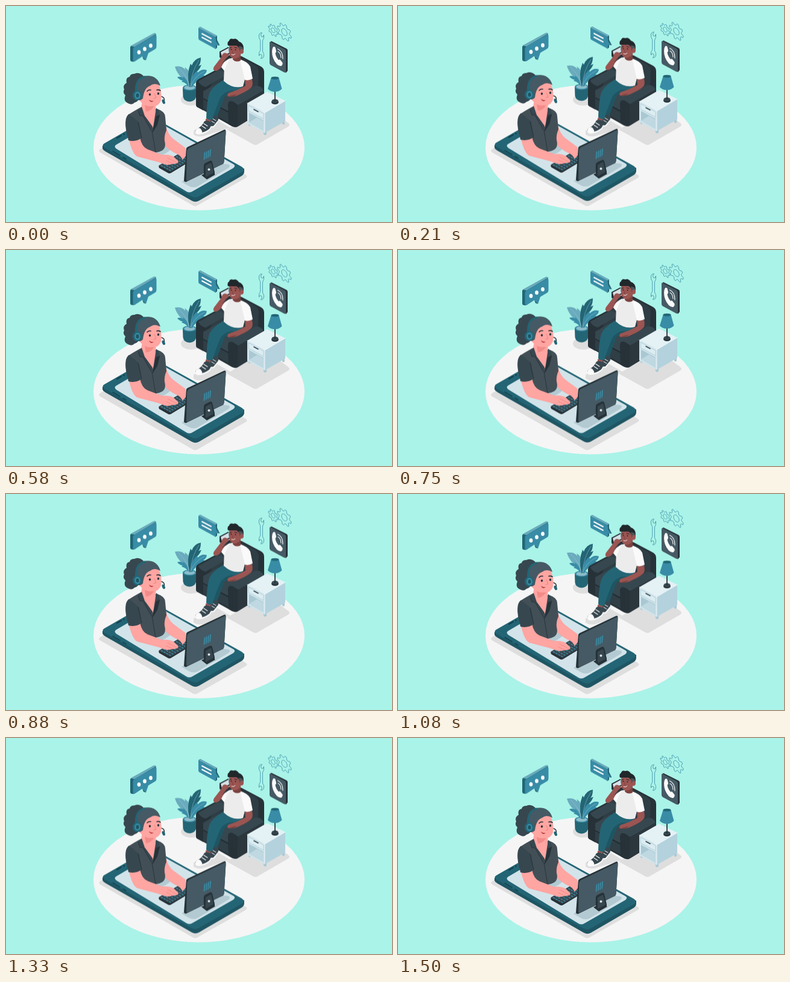
These frames come from a looping animation (640x360 px, 1.54 s). An HTML page:

```html
<!DOCTYPE html>
<html lang="en">
<head>
<meta charset="utf-8">
<title>Customer support</title>
<style>
html, body { margin: 0; width: 100%; height: 100%; overflow: hidden; background: #aaf3e8; }
svg { display: block; width: 100vw; height: 100vh; }
path { stroke-linecap: round; stroke-linejoin: round; }
.teal { fill: #236575; } .blue { fill: #388ca6; } .deep { fill: #1f5563; } .pale { fill: #6aabbd; }
.navy { fill: #37474f; } .dark { fill: #263238; } .slate { fill: #455a64; } .cloth { fill: #434f56; }
.pink { fill: #ffa5a2; } .rose { fill: #f28c88; } .brown { fill: #9b5552; } .umber { fill: #7c423f; }
.white { fill: #fafafa; } .shade { fill: #dedede; }
.line { fill: none; stroke: #388ca6; stroke-width: .8; }
</style>
</head>
<body>
<svg viewBox="0 0 640 360" preserveAspectRatio="none">
  <rect width="640" height="360" fill="#aaf3e8"/>
  <ellipse cx="320" cy="236" rx="175" ry="104.5" fill="#f5f5f5"/>
  <g class="shade">
    <path d="M157 238 L238 191 L397 281 Q402 284 397 287 L318 332 Q314 335 309 332 L156 244 Q152 241 157 238Z"/>
    <path d="M371 203 L432 168 L468 195 Q472 198 468 201 L418 230 Q414 233 409 230 L366 206Z"/>
    <path d="M311 208 L345 187 L372 203 L330 216 Q318 220 311 214Z"/>
    <ellipse cx="307" cy="156" rx="17" ry="10"/>
  </g>

  <g id="bubbleA">
    <path class="teal" d="M208 66.5 L245 46 Q248 45 249 48 L213 93 Q206 94 206 90 L206 69 Q206 67.5 208 66.5Z"/>
    <path class="pale" d="M207 67 L245 46 Q248 45 249 47 L213 68.5Z"/>
    <path class="blue" d="M213 68.5 L246 49.5 Q249.5 47.5 249.5 51 L249.5 68 Q249.5 71 247 72.5 L236 79 L232 91 L226 84.5 L214 92.5 Q210.5 94 210.5 90 L210.5 72.5 Q210.5 70 213 68.5Z"/>
    <path class="deep" d="M226 84.5 L228 89.5 L232 91Z"/>
    <g class="white"><ellipse cx="220.5" cy="77.5" rx="2.9" ry="3.5"/><ellipse cx="230" cy="72" rx="2.9" ry="3.5"/><ellipse cx="240" cy="66.5" rx="2.9" ry="3.5"/></g>
  </g>

  <g id="bubbleB">
    <path class="teal" d="M319 37 L322 35 L350 50 L350 57 L354.5 66 L350 66 L350 70 L347 72Z"/>
    <path class="pale" d="M319 37 L322 35 L350 50 L347 52Z"/>
    <path class="blue" d="M319 37 L346 51.5 Q348 53 348 55 L348 59 L353 66 L348 66 L348 70 Q348 72 346 71 L320.5 57 Q319 56 319 54Z"/>
    <path d="M325 46.5 L340 54.5 M325 52.5 L340 60.5" fill="none" stroke="#fafafa" stroke-width="2"/>
  </g>

  <g id="tools">
    <g class="line">
      <path d="M421.5 57 Q418.5 53 419.5 48 Q421 44 424.5 44.5 L422.5 48 L423.5 51 L426 51.5 L427.5 48 Q428.5 54 425.5 58 L425.5 76 Q428.5 79 427.5 84 Q426 88 422.5 87.5 L424.5 84 L423.5 81 L421 80.5 L419.5 83 Q418.5 78 421.5 74Z"/>
      <path id="gears"/>
    </g>
    <path class="dark" d="M437 61 L440 58.5 L465 71 Q467 72 467 74 L467 108 L464 111.5Z"/>
    <path class="slate" d="M439 60 L462 72 Q464 73.5 464 75.5 L464 108.5 Q464 112 461 110.5 L439 98.5 Q437 97 437 95 L437 61.5 Q437 59 439 60Z"/>
    <path class="white" d="M442.5 69 Q444 66.500 446.500 69 L448 75 Q448.500 77 446.500 78.500 Q447.500 85 452 90 Q453.500 88.500 455 90 L458.500 94.500 Q459.500 97 457 99.500 Q454 101.500 449 97 Q441 88 441 76 Q441 72 442.500 69Z"/>
    <path d="M451 76 Q455.500 78 456 86 M450.500 71.500 Q459 75 459 88" fill="none" stroke="#fafafa" stroke-width="1.200"/>
  </g>

  <g id="plant">
    <path class="teal" d="M293 136 Q304 128 316 136 L315 152 Q313 159 304.5 159.500 Q295 159 293.500 151Z"/>
    <ellipse cx="304.500" cy="136" rx="11.500" ry="4.800" class="blue"/>
    <ellipse cx="304.500" cy="136" rx="9" ry="3.500" fill="#8dbcc9"/>
    <path class="pale" d="M303 135 Q302 124 292 120 Q283 112 280 101 Q291 99 297 106 L296.500 102 Q307 109 307 123 L306 135Z"/>
    <path class="teal" d="M304 135 Q299 113 306 96 L308 99 Q312 88 323 86 Q323 96 319 100 L324 98 Q320 108 314 111 L319 111 Q310 121 308 135Z"/>
    <path class="blue" d="M306 135 Q307 114 317 108 L318 111 Q325 104 333 107 Q332 113 327 115 L330 116 Q325 122 319 122 L321 124 Q312 127 309 135Z"/>
    <path class="blue" d="M303 134 Q301 122 293 117 L294 120 Q288 116 284 119 Q289 124 293 124 L291 126 Q299 128 302 134Z"/>
    <path d="M306 134 Q307 110 320 90 M306 134 Q312 117 329 109 M304 134 Q303 119 286 103" fill="none" stroke="#a5cbd6" stroke-width=".5"/>
  </g>

  <g id="chair">
    <path class="dark" d="M315 128 Q316 123 321 121 L347 107 Q355 104 359 105 L360 87 Q375 77 391 84 L423 101 Q428 104 428 110 L428 174 L384 201 Q379 203 374 200 L317 168 Q315 167 315 164Z"/>
    <path d="M360 91 Q376 80 390 87 L414 99 Q419 103 419 110 L418 134 L372 160 L335 142Z" fill="#2f3d44"/>
    <path class="navy" d="M319 125 L350 108 Q357 106 362 112 L362 117 L331 135 Q320 132 319 125Z"/>
    <path class="navy" d="M327 142 L352 128 L392 146 L370 164 L370 176 L327 154Z"/>
    <path d="M327 155 L369 178 L369 194 L327 171Z" fill="#303e46"/>
    <path d="M327 154 L370 177" fill="none" stroke="#1c262b"/>
    <path class="dark" d="M315 132 Q316 126 322 130 Q327 134 327 140 L327 174 L317 168.500 Q315 167 315 164Z"/>
    <path class="navy" d="M368 163 Q370 156 378 152 L413 133 Q424 132 427 141 L385 165 L374 158Z"/>
    <path class="dark" d="M368 164 Q369 157 375 159 Q384 162 384 171 L384 201 Q379 204 369 197Z"/>
    <path d="M384 166 L428 141 L428 174 L384 201Z" fill="#2b373d"/>
  </g>

  <g id="man">
    <path class="brown" d="M341 181 L351 179 L350 188 L340 190Z M331 188 L341 187 L339 196 L331 195Z"/>
    <path class="navy" d="M341 184 L351 181 Q354 188 350 194 L343 201 L337 200Z"/>
    <path d="M336 201 L344 200 L352 190 L351 194 L345 202 Q341 203 336 202Z" class="white"/>
    <path d="M343 188 L348 191 M341 192 L346 195" stroke="#fafafa"/>
    <path class="deep" d="M383 131 Q395 140 379 145 L363 150 L351 182 L340 184 Q342 158 351 145Z"/>
    <path class="teal" d="M361 123 Q374 137 392 134 Q390 141 377 141 Q366 140 357 150 Q353 156 342 189 Q336 191 332 187 Q333 159 337 146 Q341 135 361 123Z"/>
    <path class="navy" d="M329 192 Q335 189 340 194 Q341 202 336 207 Q327 214 318 212 Q313 211 315 206 Q325 201 329 192Z"/>
    <path class="white" d="M315 206 Q319 202 322 204 Q327 209 324 212 Q316 214 314 210Z"/>
    <path d="M314 210 Q325 214 337 205 L340 200 L339 206 Q328 215 318 214 Q314 213 314 210Z" class="white"/>
    <path d="M325 200 L331 204 M328 196 L334 200" stroke="#fafafa" stroke-width="1.200"/>
    <path d="M354 76 L369 68 L371 80 L357 87 Q354 87 354 84Z" class="dark"/>
    <path d="M356 77 L369 70 L370 78 L358 84Z" fill="#d5e1e6"/>
    <path class="brown" d="M364 92 Q353 110 346 108 Q342 106 345 101 L358 84 Q358 79 363 78 L369 80 Q371 83 365 87 L358 96 L366 89Z"/>
    <path class="brown" d="M396 121 L407 118 Q410 129 408 134 Q404 140 388 147 Q380 152 369 151 Q365 149 369 145 L383 140 L397 133Z"/>
    <path class="umber" d="M374 149 L383 147 L377 151 L369 151Z"/>
    <path d="M370 88 Q379 84 390 90 L396 98 L396 122 L393 134 Q376 139 361 125 L362 98Z" fill="#ececec"/>
    <path class="white" d="M388 89 Q401 93 405 101 L409 121 Q402 125 396 123 L392 106Z M372 87 L366 97 L362 108 L357 102 Q361 91 372 87Z"/>
    <path class="umber" d="M377 82 L389 80 L389 91 Q381 95 376 89Z"/>
    <path class="brown" d="M370 65 Q380 58 390 66 L390 79 Q387 87 379 88 Q371 87 370 78Z"/>
    <path d="M368 66 Q366 60 370 58 Q371 53 377 55 Q382 53 386 59 Q394 62 394 70 L393 77 L388 76 Q387 68 382 66 Q374 66 368 66Z" fill="#20282c"/>
    <path d="M386 67 Q393 67 394 72 L391 80 L387 74Z" fill="#4b5357"/>
    <ellipse class="brown" cx="391" cy="75.500" rx="3" ry="4"/>
    <g fill="#20282c"><circle cx="373.500" cy="72.500" r="1"/><circle cx="380.500" cy="73" r="1"/></g>
    <path d="M371 70 L374 69 M379 69 L383 70" stroke="#20282c" fill="none"/>
    <path d="M376 74 L375 78 L377 78" stroke="#7c423f" stroke-width=".8" fill="none"/>
    <path d="M374 81 Q377 83 380 80" stroke="#fafafa" stroke-width=".9" fill="none"/>
  </g>

  <g id="table">
    <path d="M402 195 h4 v4 l-2 1 l-2 -1z M427 209 h5 v5 l-2.500 1.500 l-2.500 -1.500z M458 193 h4 v4 l-2 1 l-2 -1z" fill="#a9c9d4"/>
    <path d="M400 162 L429 178 L429 211.500 L400 196Z" fill="#cfe4eb"/>
    <path d="M429 178 L463 158 L463 192 L429 211.500Z" fill="#b3d2dd"/>
    <path d="M400 162 L433 143 L463 158 L429 178Z" fill="#e4f1f5"/>
    <path d="M402.500 166 L427 179.500 L427 188 L402.500 175Z" fill="#dcedf2" stroke="#a9c9d4" stroke-width=".7"/>
    <path d="M403 178 L427 191 L427 207.500 L403 194Z" fill="#a9c8d2"/>
    <path d="M403 194 L416 186 L427 192 L427 207.500Z" fill="#bfd8e1"/>
    <path d="M400 162 L429 178 L463 158 M429 178 V211" fill="none" stroke="#f1f8fa" stroke-width=".8"/>
    <path d="M411 172.500 L418 176.300" stroke="#37474f" stroke-width="1.600"/>
  </g>
  <g id="lamp">
    <ellipse cx="446" cy="160.500" rx="6" ry="3.500" class="dark"/>
    <ellipse cx="446" cy="158.500" rx="5.500" ry="3.300" class="navy"/>
    <path d="M446 139 V158" stroke="#263238" stroke-width="1.800"/>
    <path class="blue" d="M439.500 120 L452.500 120 L457.500 138 Q453 143 446 143 Q438 143 434 138Z"/>
    <ellipse cx="446" cy="120" rx="6.500" ry="2.300" class="teal"/>
  </g>

  <g id="desk">
    <path class="deep" d="M160 233 L160 237.500 Q161 240.500 165 242.500 L308 324.500 Q314 328 320 324.500 L391 283 Q395 280 395 276 L395 271Z"/>
    <path class="teal" d="M163 229 L234 188 Q241 184 248 188 L391 268 Q398 273 391 277 L320 317 Q314 321 307 317 L163 236 Q158 232 163 229Z"/>
    <path d="M183 231 L246 194 Q250 192 255 195 L376 263 Q382 266 377 270 L309 309 Q304 312 299 309 L183 238 Q178 234 183 231Z" fill="#d2e4ea"/>
    <path d="M177 242 L189 249 M194 252 L199 255" stroke="#123945" stroke-width="1.400"/>
    <path d="M184 220 L191 216" stroke="#123945" stroke-width="2"/><circle cx="195.500" cy="213.800" r="1.200" fill="#123945"/>
    <path d="M210 235 Q240 265 270 242 Q283 232 264 221Z M291 293 L340 261 L369 264 Q374 267 367 271 L317 301 Q310 304 303 300Z" fill="#b3cad2"/>

    <g id="keys">
      <path d="M253 267 L295 242 L315 253 L274 278 Q271 280 268 278 L254 270Z" class="dark"/>
      <path d="M253 266 L295 241 L315 252 L273 276Z" class="navy"/>
    </g>

    <path class="pink" d="M253 196 L265 199 Q268 214 278 222 L297 236 Q300 242 299 249 L293 256 L288 249 L278 244 Q262 235 255 220Z"/>
    <path class="cloth" d="M225 168 L252 172 Q264 176 264 185 L266 207 Q262 216 263 225 Q267 239 254 243 Q239 247 225 238 L218 204 L201 217 Q195 192 203 181 Q212 175 225 168Z"/>
    <path class="pink" d="M226 157 L249 163 L248 173 L249 181 L244 203 L232 186 L223 176Z"/>
    <path class="rose" d="M230 165 Q238 169 246 166 Q241 175 232 176Z"/>
    <path class="navy" d="M225 168 L219 174 L222 183 L227 183 L241 207 L243 201 L230 183 Z M249 170 L253 173 L255 182 L249 184 L243 209 L245 196Z"/>
    <path d="M219 174 L222 183 L227 183 L241 208 M243 209 L249 184 L255 182 M242 208 L248 244" fill="none" stroke="#263238" stroke-width=".9"/>
    <path class="dark" d="M249 184 L255 182 L251 198 L243 211Z"/>
    <path class="pink" d="M203 219 L222 219 Q225 235 235 239 L259 248 Q272 247 279 252 L286 259 Q285 263 279 263 L267 265 Q260 263 252 260 L218 251 Q209 247 203 219Z"/>
    <path d="M268 253 L283 261 M266 258 L277 263" stroke="#ee827e" stroke-width=".8" fill="none"/>
    <path class="navy" d="M204 180 Q195 186 200 209 L203 224 Q215 227 225 220 L221 194Z"/>
    <path d="M219 194 L225 220" stroke="#263238" stroke-width=".9" fill="none"/>

    <path d="M230 119 Q222 109 213 113 Q206 113 205 118 Q198 119 200 128 Q193 132 196 139 Q193 145 198 149 Q194 158 202 162 Q209 166 213 161 Q222 159 223 145 L230 132Z" class="navy"/>
    <path class="pink" d="M221 143 Q229 122 253 130 Q259 144 257 157 Q254 168 241 167 Q227 165 222 158Z"/>
    <path d="M214 143 Q213 122 228 117 Q250 113 256 133 Q246 127 239 133 Q229 136 227 154 Q223 159 218 156Z" class="slate"/>
    <path d="M217 145 Q213 122 230 118" fill="none" stroke="#236575" stroke-width="3"/>
    <ellipse class="teal" cx="217.500" cy="149" rx="7.500" ry="8.500"/>
    <ellipse class="blue" cx="218" cy="149" rx="4.800" ry="6"/>
    <ellipse class="deep" cx="218" cy="149" rx="2.600" ry="3.500"/>
    <g fill="#263238"><ellipse cx="238.500" cy="147.500" rx="1.700" ry="2"/><ellipse cx="252.500" cy="146" rx="1.700" ry="2"/></g>
    <path d="M234 142 Q237 139 240 140 M250 140 Q253 139 256 141" fill="none" stroke="#263238" stroke-width="1.600"/>
    <path d="M246 146 L249 153 L245 154" fill="none" stroke="#ee827e"/>
    <path d="M237 156 Q241 159 245 158 Q241 162 238 158Z" fill="#b73d3d"/>
    <path d="M258 151 Q263 152 262.500 158" fill="none" stroke="#263238" stroke-width="1.400"/>
    <ellipse cx="261" cy="159.500" rx="2.300" ry="4" transform="rotate(-24 261 159)" class="teal"/>

    <path class="dark" d="M324 282 L336 276 L347 281 L333 289Z"/>
    <path class="dark" d="M299 237 L301 235 L361 206.500 Q364.500 205 364.500 209 L361.500 260 Q361 263 358 264 L299 293 Q296 294 295 291Z"/>
    <path class="slate" d="M303 237 L361 209 Q364.500 207 364.500 211 L361.500 260 Q361 263 358 264 L302 291 Q299 292 299 289 L300 242 Q300 239 303 237Z"/>
    <path class="dark" d="M328 266 Q328 263 331 261.500 L338 258 Q341 257 342 260 L346 277 L346 281 L331 287 Q327 285 328 266Z"/>
    <path class="navy" d="M331 266 L340 261 L344 278 L331 285Z"/>
    <circle cx="336.500" cy="272.500" r="2" fill="#d9e2e5"/>
    <path id="vents" fill="none" stroke="#388ca6" stroke-width="1.800"/>
  </g>
</svg>
<script>
const $ = id => document.getElementById(id);
const LOOP = 1540;

// Closed curve round (cx, cy) on an upright isometric plane.
function isoRing(cx, cy, steps, radius) {
  const points = [];
  for (let i = 0; i < steps; i++) {
    const a = (i + 0.5) / steps * Math.PI * 2, r = radius(i);
    const u = Math.cos(a) * r, v = Math.sin(a) * r;
    points.push((cx + u * 0.87).toFixed(2) + ' ' + (cy + v + u * 0.5).toFixed(2));
  }
  return 'M' + points.join('L') + 'Z';
}
const gear = (cx, cy, r) =>
  isoRing(cx, cy, 32, i => i % 4 < 2 ? r : r * 0.74) + isoRing(cx, cy, 24, () => r * 0.4);
$('gears').setAttribute('d', gear(443, 40.5, 9.3) + gear(461.5, 43.5, 13.4));

// Rows of key caps.
let caps = '';
for (let row = 0; row < 4; row++)
  for (let col = 0; col < 9; col++)
    caps += `M${257.5 + col * 4.2 + row * 4.4} ${266 - col * 2.5 + row * 2.4}l2 1.1`;
$('keys').insertAdjacentHTML('beforeend',
  `<path d="${caps}" fill="none" stroke="#388ca6" stroke-width="1.5"/>`);

let slots = '';
for (let i = 0; i < 4; i++) slots += `M${328.5 + i * 3.2} ${255.5 - i * 1.6}l1 -11`;
$('vents').setAttribute('d', slots);

// Each part floats up by `rise` and back on a sine-like ease.
function float(id, rise, delay = -45) {
  $(id).animate(
    [{ transform: 'translateY(0)' }, { transform: `translateY(${-rise}px)` }],
    { duration: LOOP / 2, delay, direction: 'alternate', iterations: Infinity,
      easing: 'cubic-bezier(.37,0,.63,1)' });
}
float('desk', 5.5);
float('chair', 6);
float('man', 6);
float('plant', 5.5);
float('tools', 5);
float('table', 12);
float('lamp', 12);
float('bubbleA', 1.5, -300);
float('bubbleB', 1, -300);
</script>
</body>
</html>
```
